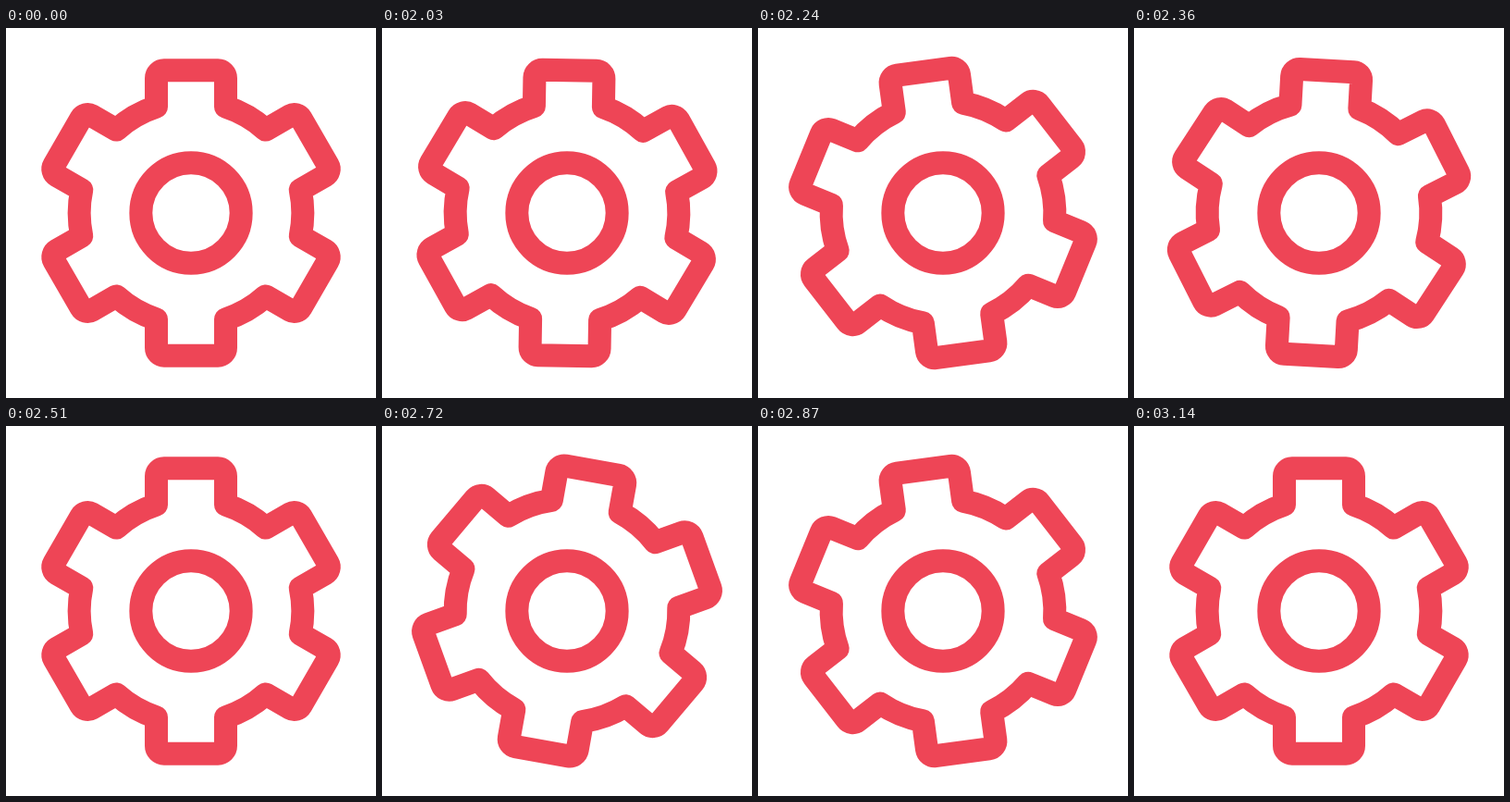
An HTML page that plays this animation: 400x400 px, repeating every 3.23 s.

```html
<!DOCTYPE html>
<html lang="en">
<head>
<meta charset="utf-8">
<title>Turning cog</title>
<style>
  html, body { margin: 0; width: 100%; height: 100%; overflow: hidden; background: #fff; }
  svg { display: block; width: 100%; height: 100%; }
</style>
</head>
<body>
<svg viewBox="-200 -200 400 400" fill="none" stroke="#ee4556" stroke-width="25" stroke-linejoin="round">
  <circle r="54.17"/>
  <path id="cog"/>
</svg>
<script>
const LOOP = 3230, STEP = 30, TURN = 510, STARTS = [2000, 2630], TOOTH = 60;
const HALF = 37.5, TIP = 154.17, CORNER = 8.33, RIM = 120.83;
const cog = document.getElementById('cog');

function rotated(x, y, degrees) {
  const a = degrees * Math.PI / 180, c = Math.cos(a), s = Math.sin(a);
  return `${(x * c - y * s).toFixed(2)} ${(x * s + y * c).toFixed(2)}`;
}

function cogPath() {
  const root = -Math.sqrt(RIM * RIM - HALF * HALF);
  const shoulder = CORNER - TIP, flat = HALF - CORNER;
  const round = `A${CORNER} ${CORNER} 0 0 1 `;
  let d = '';
  for (let a = 0; a < 360; a += TOOTH) {
    const at = (x, y) => rotated(x, y, a);
    d += (a ? `A${RIM} ${RIM} 0 0 0 `.replace('0 0 0', '0 0 1') : 'M') + at(-HALF, root)
      + 'L' + at(-HALF, shoulder) + round + at(-flat, -TIP)
      + 'L' + at(flat, -TIP) + round + at(HALF, shoulder)
      + 'L' + at(HALF, root);
  }
  return d + `A${RIM} ${RIM} 0 0 1 ` + rotated(-HALF, root, 0) + 'Z';
}

const bezier = (s, a, b) => 3 * s * (1 - s) ** 2 * a + 3 * s * s * (1 - s) * b + s ** 3;

// Slow start, slight overshoot, soft return.
function ease(p) {
  if (p <= 0) return 0;
  if (p >= 1) return 1;
  let low = 0, high = 1;
  for (let i = 0; i < 30; i++) {
    const mid = (low + high) / 2;
    if (bezier(mid, 0.33, 0.275) < p) low = mid; else high = mid;
  }
  return bezier(low, 0, 1.36);
}

function draw(now) {
  const t = now % LOOP;
  const turned = STARTS.reduce((sum, start) =>
    sum + ease(Math.floor((t - start) / STEP) * STEP / TURN), 0);
  cog.setAttribute('transform', `rotate(${turned * TOOTH})`);
}

function tick(now) {
  draw(now);
  requestAnimationFrame(tick);
}

cog.setAttribute('d', cogPath());
draw(0);
requestAnimationFrame(tick);
</script>
</body>
</html>
```
